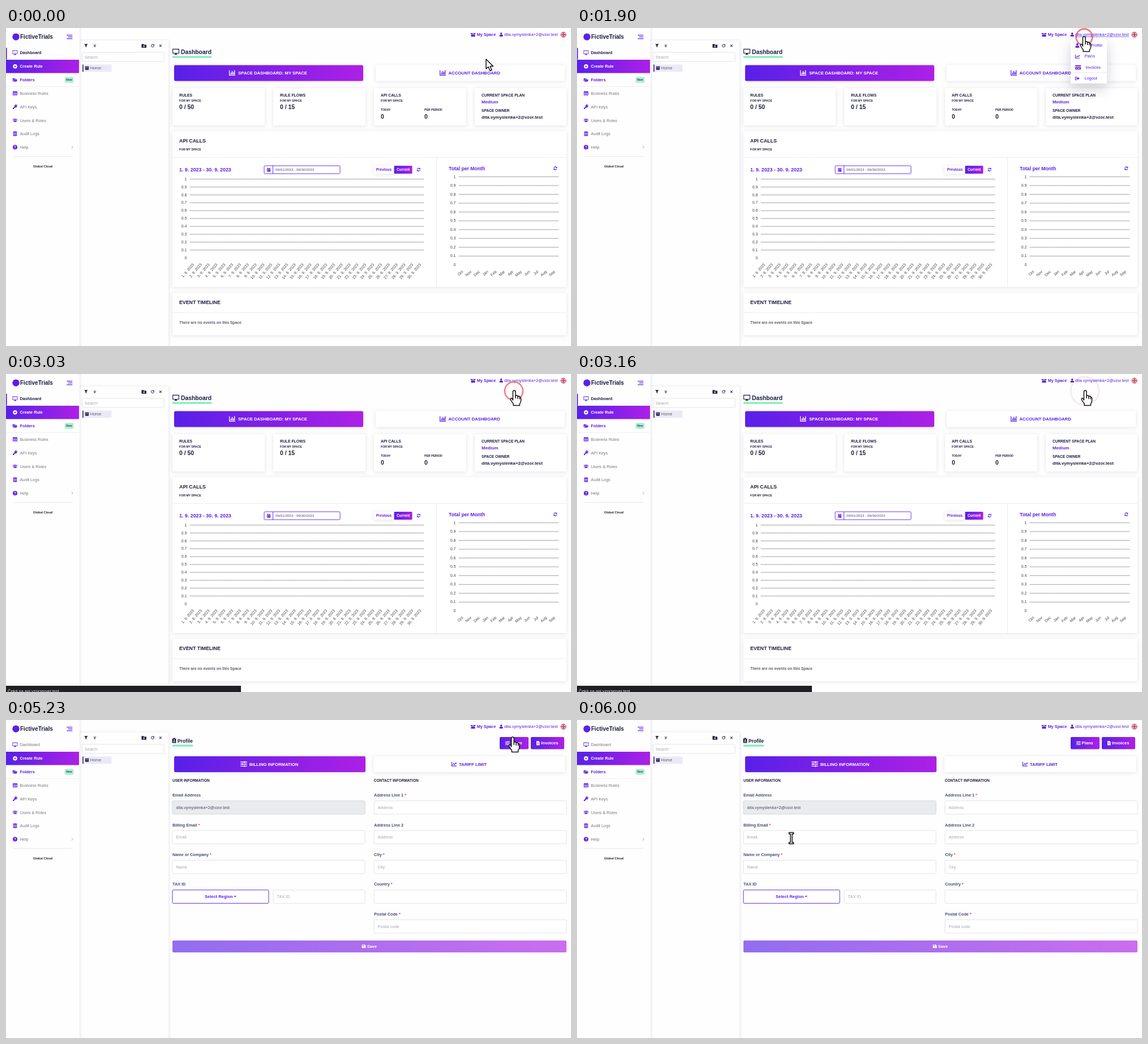
An HTML page that plays this animation: 998 by 561 pixels, repeating every 8 s.

```html
<!DOCTYPE html>
<html lang="en">
<head>
<meta charset="utf-8">
<title>Dashboard to profile</title>
<style>
  html, body { margin: 0; width: 100%; height: 100%; overflow: hidden; background: #fefefe; }
  svg { display: block; width: 100%; height: 100%; font-family: "Liberation Sans", Arial, sans-serif; }
  .card { fill: #fff; filter: drop-shadow(0 1px 3px rgba(30, 30, 80, .13)); }
  .panel { fill: #fefefe; filter: drop-shadow(1px 0 2px rgba(30, 30, 80, .12)); }
  .menu { fill: #fff; filter: drop-shadow(0 9px 11px rgba(20, 20, 60, .2)); }
  .cursor { fill: #fff; stroke: #111; stroke-width: 1.5; stroke-linejoin: round; }
</style>
</head>
<body>
<svg id="stage" viewBox="0 0 998 561"></svg>
<script>
const PURPLE = '#5a20e6', NAVY = '#1c1c42', GREY = '#77777f', LABEL = '#454b78', PALE = '#a4a6ae';
const GRADIENT = 'url(#vivid)', MINT = '#79efb5';
const BRAND = 'FictiveTrials', EMAIL = 'dita.vymyslenka+2@vzor.test';

// Icons on a 16 x 16 grid.
const ICONS = {
  monitor: 'M0 1H16V12H10V14H12V15H4V14H6V12H0ZM1.5 2.5V10.5H14.5V2.5Z',
  plus: 'M8 0A8 8 0 1 0 8 16A8 8 0 1 0 8 0ZM7 4H9V7H12V9H9V12H7V9H4V7H7Z',
  folder: 'M0 3H6L8 5H13V7H4L1 13H0ZM5 8H16L13 14H2Z',
  table: 'M0 1H16V15H0ZM2 5.5V8.5H7V5.5ZM9 5.5V8.5H14V5.5ZM2 10.5V13H7V10.5ZM9 10.5V13H14V10.5Z',
  key: 'M11 0A5 5 0 0 0 6.3 7L0 13V16H4V14H6V12L9 9.7A5 5 0 1 0 11 0ZM12 2.5A1.5 1.5 0 1 1 12 5.5A1.5 1.5 0 1 1 12 2.5Z',
  user: 'M8 0A4 4 0 1 1 8 8A4 4 0 1 1 8 0ZM1 16V13Q1 9 5 9H11Q15 9 15 13V16Z',
  users: 'M8 2A3 3 0 1 1 8 8A3 3 0 1 1 8 2ZM3 14V12Q3 9 6 9H10Q13 9 13 12V14ZM2.5 3A2 2 0 1 1 2.5 7A2 2 0 1 1 2.5 3ZM13.5 3A2 2 0 1 1 13.5 7A2 2 0 1 1 13.5 3ZM0 11V9.5Q0 8 2 8H4Q2 9.5 2 11ZM16 11V9.5Q16 8 14 8H12Q14 9.5 14 11Z',
  database: 'M1 2Q1 0 8 0T15 2V4Q15 5 8 5T1 4ZM1 6Q8 8 15 6V9Q15 10 8 10T1 9ZM1 11Q8 13 15 11V14Q15 16 8 16T1 14Z',
  disc: 'M8 0A8 8 0 1 0 8 16A8 8 0 1 0 8 0Z',
  bars: 'M0 2H16V4H0ZM4 7H16V9H4ZM0 12H16V14H0Z',
  filter: 'M1 1H15L10 8V15L6 12V8Z',
  chevrons: 'M3 1L8 6L13 1V4L8 9L3 4ZM3 7L8 12L13 7V10L8 15L3 10Z',
  folderPlus: 'M0 2H6L8 4H16V14H0ZM7.2 6V8.2H5V9.8H7.2V12H8.8V9.8H11V8.2H8.8V6Z',
  reload: 'M14 8A6 6 0 1 1 12 3.5L14 1.5V7H8.5L10.5 5A4 4 0 1 0 12 8Z',
  sync: 'M1 7A7 7 0 0 1 13 3L15 1V7H9L11 5A4.6 4.6 0 0 0 3.3 7ZM15 9A7 7 0 0 1 3 13L1 15V9H7L5 11A4.6 4.6 0 0 0 12.7 9Z',
  close: 'M3 1L8 6L13 1L15 3L10 8L15 13L13 15L8 10L3 15L1 13L6 8L1 3Z',
  archive: 'M0 1H16V5H0ZM1 6H15V15H1ZM5.5 8V9.5H10.5V8Z',
  chart: 'M0 1H1.8V13.2H16V15H0ZM4 7H6V12H4ZM7 3H9V12H7ZM10 6H12V12H10ZM13 1H15V12H13Z',
  trend: 'M0 1H2V13H16V15H0ZM3 10L7 5L10 8L13 5L11.5 3.5H16V8L14.5 6.5L10 11L7 8L4.5 11.5Z',
  card: 'M0 2H16V5H0ZM0 7H16V14H0ZM2 10V12H6V10ZM8 10V12H13V10Z',
  logout: 'M0 2H6V4H2V12H6V14H0ZM9 3L16 8L9 13V10H5V6H9Z',
  box: 'M0 3L8 4L16 3L14 7L9.5 6.5L8 4.5L6.5 6.5L2 7ZM2 8L7 7.7L8 6.7L9 7.7L14 8V14H2Z',
  calendar: 'M3 0H5V2H11V0H13V2H15V5H1V2H3ZM1 6H15V16H1ZM3.5 8V10H6V8ZM10 8V10H12.5V8ZM3.5 12V14H6V12Z',
  sliders: 'M0 2H9V1H11V2H16V4H11V5H9V4H0ZM0 7H3V6H5V7H16V9H5V10H3V9H0ZM0 12H9V11H11V12H16V14H11V15H9V14H0Z',
  file: 'M2 0H10L14 4V16H2ZM4.5 7V8.5H11.5V7ZM4.5 10V11.5H11.5V10Z',
  badge: 'M2 2H6V0H10V2H14V16H2ZM8 5A2 2 0 1 1 8 9A2 2 0 1 1 8 5ZM4.5 13Q4.5 10 8 10T11.5 13Z',
  save: 'M0 1H12L16 5V15H0ZM2 3V6H10V3ZM8 8.5A2 2 0 1 1 8 12.5A2 2 0 1 1 8 8.5Z'
};

const text = (x, y, str, size, fill, attrs = '') =>
  `<text x="${x}" y="${y}" font-size="${size}" fill="${fill}" ${attrs}>${str}</text>`;
const bold = (x, y, str, size, fill = NAVY, attrs = '') => text(x, y, str, size, fill, `font-weight="700" ${attrs}`);
const MIDDLE = 'text-anchor="middle"';
const rect = (x, y, x2, y2, attrs) => `<rect x="${x}" y="${y}" width="${x2 - x}" height="${y2 - y}" ${attrs}/>`;
const fill = (x, y, x2, y2, color, radius = 0) => rect(x, y, x2, y2, `fill="${color}" rx="${radius}"`);
const card = (x, y, x2, y2) => rect(x, y, x2, y2, 'class="card" rx="2"');
const outline = (x, y, x2, y2, stroke = '#dfe0e4', inside = '#fff') =>
  rect(x, y, x2, y2, `rx="1.5" fill="${inside}" stroke="${stroke}" stroke-width=".9"`);
const path = (d, stroke, width = 1, attrs = '') =>
  `<path d="${d}" fill="none" stroke="${stroke}" stroke-width="${width}" ${attrs}/>`;
// Icons are placed by their centre.
const icon = (name, cx, cy, size, color = PURPLE) =>
  `<path d="${ICONS[name]}" fill="${color}" fill-rule="evenodd" transform="translate(${cx - size / 2} ${cy - size / 2}) scale(${size / 16})"/>`;
const group = (id, body) => `<g id="${id}">${body}</g>`;

function sidebar() {
  const rows = [['table', 'Business Rules'], ['key', 'API Keys'], ['users', 'Users &amp; Roles'], ['database', 'Audit Logs'], ['disc', 'Help']];
  return rect(0, -5, 130, 566, 'class="panel"') +
    `<circle cx="17.5" cy="15.7" r="6.2" fill="${PURPLE}"/>` + bold(25, 19.3, BRAND, 10) +
    icon('bars', 112.3, 15.7, 10) + icon('monitor', 16, 43.5, 9) +
    fill(0, 56, 129, 79.5, GRADIENT) + icon('plus', 16, 67.8, 7.5, '#fff') + bold(24.5, 70.4, 'Create Rule', 7.28, '#fff') +
    icon('folder', 16, 91.3, 8.5) + bold(24.5, 94, 'Folders', 7.28, PURPLE) +
    fill(103.5, 86.3, 119.5, 96.7, '#b3ecd5', 3) + bold(111.5, 93.3, 'New', 5, '#16594a', MIDDLE) +
    path('M0 103.5H129', '#f0f0f3') +
    rows.map(([name, label], i) => icon(name, 16, 115.3 + i * 23.75, 8) + text(24.5, 118 + i * 23.75, label, 7.28, GREY)).join('') +
    bold(16, 212.6, '?', 6.5, '#fff', MIDDLE) + path('M116 208L118.3 210.3L116 212.6', '#999', .8) +
    path('M13 226.8H117', '#e6e6ea') + bold(65, 246.2, 'Global Cloud', 5.5, '#222', MIDDLE);
}

function folderPanel() {
  return rect(126, 22, 287, 566, 'class="panel"') +
    icon('filter', 141.3, 31.3, 7, NAVY) + icon('chevrons', 156.8, 31.3, 6, NAVY) +
    icon('folderPlus', 243.7, 31.5, 8.5, NAVY) + icon('reload', 259, 31.3, 7.5, NAVY) + icon('close', 272.8, 31.3, 5, NAVY) +
    outline(134.5, 43, 279, 59) + text(139, 53.6, 'Search', 7.28, PALE) +
    fill(135, 64.5, 186.5, 77.3, '#ece9f7') + fill(135, 64.5, 136.8, 77.3, '#4a3a9c') +
    icon('archive', 143, 70.8, 7, NAVY) + text(148.8, 73.4, 'Home', 7.28, '#5c5c70');
}

function header() {
  return icon('box', 825, 11.7, 9.5) + bold(831.7, 14.2, 'My Space', 7.28, PURPLE) +
    icon('user', 874.7, 11.4, 7) + text(880, 14.2, EMAIL, 7.28, PURPLE) +
    `<g transform="translate(984.6 11.7)" clip-path="url(#round)">` +
    fill(-6, -6, 6, 6, '#28307e') + path('M-6 -5L6 5M-6 5L6 -5', '#fff', 2) + path('M-6 -5L6 5M-6 5L6 -5', '#d8344a', .8) +
    path('M-6 0H6M0 -6V6', '#fff', 3.2) + path('M-6 0H6M0 -6V6', '#d8243c', 1.8) + '</g>';
}

function axes(left, right, top, step) {
  return Array.from({ length: 11 }, (_, i) => {
    const y = top + i * step;
    return text(left - 5.5, y + 2.5, (10 - i) / 10, 7, '#444', 'text-anchor="end"') +
      (i < 10 ? path(`M${left} ${y + .4}H${right}`, '#333', .9, 'stroke-dasharray="1.04 1.04"') : '');
  }).join('');
}
const slanted = (labels, x, y, step, angle) => labels.map((label, i) =>
  text(0, 0, label, 6.8, '#444', `text-anchor="end" transform="translate(${x + i * step} ${y}) rotate(${angle})"`)).join('');

function counter(x, title, value) {
  return card(x, 106, x + 163, 172) + bold(x + 12, 121.4, title, 6.8) + bold(x + 12, 130, 'FOR MY SPACE', 5.15) +
    (value ? bold(x + 12, 143.4, value, 10.4) : '');
}

function dashboard() {
  const days = Array.from({ length: 30 }, (_, i) => `${i + 1}. 9. 2023`);
  const months = 'Oct Nov Dec Jan Feb Mar Apr May Jun Jul Aug Sep'.split(' ');
  return fill(0, 35, 1.6, 55.5, PURPLE) + bold(24.5, 46.2, 'Dashboard', 7.28) +
    icon('monitor', 300, 42, 12, NAVY) + bold(309, 45.8, 'Dashboard', 10.35) + fill(294, 49.6, 363.3, 52.6, MINT) +
    rect(297, 65.5, 631, 93.5, `class="card" rx="2.5" style="fill:${GRADIENT}"`) +
    icon('chart', 399.5, 79.2, 11, '#fff') + bold(410, 82, 'SPACE DASHBOARD: MY SPACE', 7.68, '#fff') +
    card(653, 65.5, 987, 93.5) + icon('chart', 771.5, 79.2, 11) + bold(781.5, 82, 'ACCOUNT DASHBOARD', 7.75, PURPLE) +
    counter(294, 'RULES', '0 / 50') + counter(472, 'RULE FLOWS', '0 / 15') + counter(650, 'API CALLS') +
    bold(662, 146, 'TODAY', 5.15) + bold(662, 159.6, '0', 10.4) + bold(739, 146, 'PER PERIOD', 5.15) + bold(739, 159.6, '0', 10.4) +
    card(828, 106, 990, 172) + bold(840, 121.4, 'CURRENT SPACE PLAN', 6.6) + bold(840, 133, 'Medium', 7.75, PURPLE) +
    bold(840, 148, 'SPACE OWNER', 6.6) + bold(840, 160, EMAIL, 7.75) +
    card(294, 182, 990, 457) + bold(306, 202.2, 'API CALLS', 8.9) + bold(306, 215.6, 'FOR MY SPACE', 5.15) +
    path('M294 228.3H990M760.5 228V457', '#ececf0') +
    bold(306, 253.2, '1. 9. 2023 - 30. 9. 2023', 8.9, PURPLE) +
    outline(456, 243, 590, 257, PURPLE) + path('M471.5 243V257', PURPLE, .9) + icon('calendar', 464, 250, 7) +
    text(476, 252.3, '09/01/2023 - 09/30/2023', 6.25, '#4a4a66') +
    card(649.5, 243, 686, 257) + bold(653.8, 252.2, 'Previous', 6.45, PURPLE) +
    fill(685.5, 243, 717.5, 257, GRADIENT, 1.5) + bold(701.5, 252.2, 'Current', 6.45, '#fff', MIDDLE) +
    icon('sync', 728.8, 249.8, 7) + bold(782, 251, 'Total per Month', 8.67, PURPLE) + icon('sync', 970.3, 247.5, 7) +
    axes(325, 738, 266.2, 13.9) + axes(800, 976, 262, 15.55) +
    slanted(days, 332.5, 417.5, 13.83, -50) + slanted(months, 808, 430.5, 14.75, -42) +
    card(294, 467, 990, 542) + bold(306, 487.2, 'EVENT TIMELINE', 8.8) + path('M294 502H990', '#ececf0') +
    bold(306, 522, 'There are no events on this Space', 6.78, '#5c5c70');
}

function menu() {
  const rows = [['user', 'My Profile', 895.7], ['trend', 'Plans', 896.6], ['card', 'Invoices', 898.2], ['logout', 'Logout', 896.6]];
  return rect(872, 20.5, 936, 98, 'class="menu" rx="2"') + path('M872 78.6H936', '#e8e8ee') +
    rows.map(([name, label, x], i) => icon(name, i === 2 ? 885 : 883.8, 30.8 + i * 19.4, i === 2 ? 10 : 8) +
      text(x, 33 + i * 19.4, label, 7.28, PURPLE)).join('');
}

function field(x, x2, row, label, hint, required) {
  const y = 142.5 + row * 52.45;
  const star = required ? ' <tspan fill="#e8323c">*</tspan>' : '';
  return (label ? bold(x, y - 7.4, label + star, 7.25, LABEL) : '') + outline(x, y, x2, y + 23.5) + text(x + 6.5, y + 14.5, hint, 7.28, PALE);
}

function profile() {
  return text(24.5, 46.2, 'Dashboard', 7.28, GREY) +
    icon('badge', 297, 36, 9, NAVY) + bold(302.7, 39.8, 'Profile', 8.75) + fill(294, 43.6, 330, 46.8, MINT) +
    fill(872, 30, 923, 51.5, GRADIENT, 2) + icon('sliders', 885.8, 40.7, 8, '#fff') + bold(891.5, 43.4, 'Plans', 7.6, '#fff') +
    fill(927, 30, 986, 51.5, GRADIENT, 2) + icon('file', 939.8, 40.7, 7.5, '#fff') + bold(945, 43.4, 'Invoices', 7.6, '#fff') +
    rect(297, 64, 635, 92, `class="card" rx="2.5" style="fill:${GRADIENT}"`) +
    icon('sliders', 420, 77.8, 11.5, '#fff') + bold(429.7, 80.6, 'BILLING INFORMATION', 7.7, '#fff') +
    card(649, 64, 987.5, 92) + icon('trend', 791.3, 77.7, 9) + bold(800, 80.6, 'TARIFF LIMIT', 7.7, PURPLE) +
    bold(294, 109.2, 'USER INFORMATION', 6.55) + bold(649.7, 109.2, 'CONTACT INFORMATION', 6.55) +
    field(294, 634, 0, 'Email Address', '') + outline(294, 142.5, 634, 166, '#d6d9de', '#e9ecef') + text(300.5, 157, EMAIL, 7.28, '#464a58') +
    field(294, 634, 1, 'Billing Email', 'Email', true) + field(294, 634, 2, 'Name or Company', 'Name', true) +
    field(294, 464, 3, 'TAX ID', '') + outline(294, 299.85, 464, 323.35, PURPLE) +
    bold(351, 314.2, 'Select Region', 7.5, PURPLE) + `<path d="M402.5 310.3h4.4l-2.2 2.4z" fill="${PURPLE}"/>` +
    field(472, 634, 3, '', 'TAX ID') +
    field(650, 990, 0, 'Address Line 1', 'Address', true) + field(650, 990, 1, 'Address Line 2', 'Address') +
    field(650, 990, 2, 'City', 'City', true) + field(650, 990, 3, 'Country', '', true) + field(650, 990, 4, 'Postal Code', 'Postal code', true) +
    `<g opacity=".65">${fill(294, 389, 990, 410, GRADIENT, 2)}</g>` +
    icon('save', 632, 399.2, 6.8, '#fff') + bold(637.8, 401.8, 'Save', 7.4, '#fff');
}

const shape = (id, d) => `<path id="${id}" class="cursor" d="${d}"/>`;
const stage = document.getElementById('stage');
stage.innerHTML = `<defs>
  <linearGradient id="vivid"><stop stop-color="#5820e8"/><stop offset="1" stop-color="#ad20e6"/></linearGradient>
  <clipPath id="round"><circle r="5"/></clipPath></defs>` +
  folderPanel() + sidebar() + header() +
  group('dashboard', dashboard()) + group('profile', profile()) +
  `<path id="underline" d="M880 15.4H975" stroke="${PURPLE}" stroke-width=".6"/>` +
  group('menu', menu()) +
  group('status', fill(0, 550, 415, 561, '#1f2023') + text(3, 562.3, 'Čeká na api.vzorserver.test', 7.5, '#e4e4e6')) +
  '<circle id="ring" fill="none" stroke="#ee3a42" stroke-width="2.6"/>' +
  group('pointer',
    shape('arrow', 'M0 0V17L4 13.5L7 20.5L10 19.2L7.2 12.5H12.5Z') +
    shape('hand', 'M-2.6 16V1.5Q-2.6-1-.3-1T2 1.5V9Q2.6 7.6 4.2 7.8T5.9 10Q6.8 8.6 8.2 9T9.4 11Q11.6 10.4 11.6 13V17Q11.4 20.5 9.4 22.5V25.5H-1.8V22.5Q-4 20-6.8 15Q-7 12.6-5.2 12.6Q-3.8 13.2-2.6 16ZM2 9V13M5.9 10V14M9.4 11V14.5') +
    shape('beam', 'M-3.5-9.5H4.5V-7H2V8H4.5V10.5H-3.5V8H-1V-7H-3.5Z'));

const LOOP = 8000;
const MOVES = [ // start, end, from x, y, to x, y
  [70, 600, 848, 55, 896, 16],
  [2200, 2500, 896, 16, 898, 30],
  [5200, 5800, 898, 30, 378, 208]
];
const CLICKS = [[1690, 896, 16], [2795, 897, 30]];

const part = Object.fromEntries([...stage.querySelectorAll('[id]')].map(el => [el.id, el]));
const show = (id, on) => { part[id].style.display = on ? '' : 'none'; };
const progress = (t, from, to) => Math.min(1, Math.max(0, (t - from) / (to - from)));
const ease = p => p < .5 ? 2 * p * p : 1 - 2 * (1 - p) ** 2;

function pointerAt(t) {
  const [from, to, x, y, x2, y2] = MOVES.filter(move => t >= move[0]).pop() || MOVES[0];
  const p = ease(progress(t, from, to));
  return [x + (x2 - x) * p, y + (y2 - y) * p];
}

function draw(t) {
  const [x, y] = pointerAt(t);
  const onProfile = t >= 3230;
  const overEmail = !onProfile && y < 21;
  const overLink = t < 5200 ? overEmail || t > 2000 : x > 872 && y < 51.5;
  const kind = t >= 6000 ? 'beam' : overLink ? 'hand' : 'arrow';

  show('dashboard', !onProfile);
  show('profile', onProfile);
  show('menu', t >= 1800 && t < 2900);
  show('underline', overEmail);
  for (const id of ['arrow', 'hand', 'beam']) show(id, id === kind);
  part.pointer.setAttribute('transform', `translate(${x} ${y})`);
  part.status.setAttribute('opacity', progress(t, 2500, 2660) - progress(t, 3280, 3430));

  const click = CLICKS.find(([start]) => t >= start && t < start + 370);
  show('ring', click);
  if (click) {
    const age = t - click[0];
    part.ring.setAttribute('cx', click[1]);
    part.ring.setAttribute('cy', click[2]);
    part.ring.setAttribute('r', age * .068);
    part.ring.setAttribute('opacity', 1 - (age / 390) ** 2);
  }
}

const begin = performance.now();
function tick() {
  draw((performance.now() - begin) % LOOP);
  requestAnimationFrame(tick);
}
tick();
</script>
</body>
</html>
```
